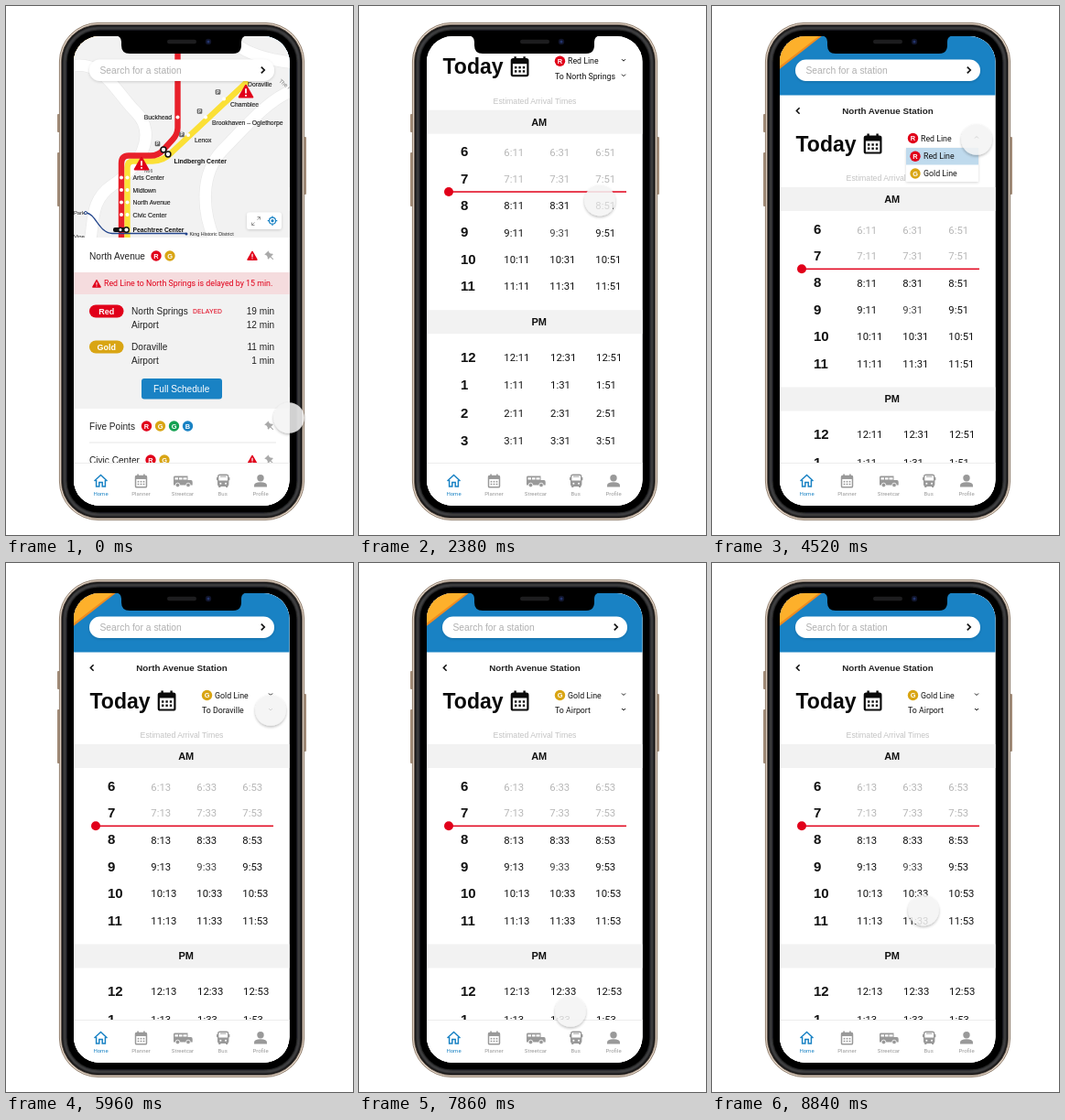
These frames come from a looping animation (379 by 578 pixels, 8920 ms). An HTML page:

```html
<!DOCTYPE html>
<html lang="en">
<head>
<meta charset="utf-8">
<title>Transit schedule prototype</title>
<style>
html, body { margin: 0; width: 100%; height: 100%; overflow: hidden; background: #fff; }
svg { display: block; width: 379px; height: 578px; }
text { font-family: "Liberation Sans", Arial, sans-serif; }
text.r { font-family: Roboto, sans-serif; }
</style>
</head>
<body>
<svg id="stage" viewBox="0 0 379 578" xmlns="http://www.w3.org/2000/svg"></svg>
<script>
const LOOP = 8920;
const RED = '#e1001a', GOLD = '#d9a514', BLUE = '#1982c4', GREEN = '#14a152', GREY = '#999';

// Shape helpers; text y is the middle of the capitals.
const rect = (x, y, w, h, fill, r = 0, more = '') =>
  `<rect x="${x}" y="${y}" width="${w}" height="${h}" rx="${r}" fill="${fill}" ${more}/>`;
const circle = (x, y, r, fill, more = '') => `<circle cx="${x}" cy="${y}" r="${r}" fill="${fill}" ${more}/>`;
const line = (d, color, w, more = '') =>
  `<path d="${d}" fill="none" stroke="${color}" stroke-width="${w}" ${more}/>`;
const fill = (d, color) => `<path d="${d}" fill="${color}"/>`;
const text = (s, x, y, size, color = '#222', more = '') =>
  `<text x="${x}" y="${(y + size * 0.358).toFixed(2)}" font-size="${size}" fill="${color}" ${more}>${s}</text>`;
const at = (x, y, body, more = '') => `<g transform="translate(${x} ${y}) ${more}">${body}</g>`;
const BOLD = 'font-weight="700"', MID = 'text-anchor="middle"', END = 'text-anchor="end"', ROBO = 'class="r"';

const badge = (x, y, s, color) =>
  circle(x, y, 5.7, color) + text(s, x, y, 7.4, '#fff', `${BOLD} ${MID}`);
const chevron = (x, y, s, dir, w = 1.2) => {
  const d = { right: `M${-s / 2} ${-s}L${s / 2} 0L${-s / 2} ${s}`, left: `M${s / 2} ${-s}L${-s / 2} 0L${s / 2} ${s}`,
    down: `M${-s} ${-s / 2}L0 ${s / 2}L${s} ${-s / 2}`, up: `M${-s} ${s / 2}L0 ${-s / 2}L${s} ${s / 2}` }[dir];
  return at(x, y, line(d, '#111', w));
};
const warning = (x, y, k = 1) => at(x, y,
  `<path d="M0 -4.6L5 4.2H-5Z" fill="${RED}" stroke="${RED}" stroke-width="1.4" stroke-linejoin="round"/>` +
  line('M0 -2.2V1.4M0 2.4V3.6', '#fff', 1.2), `scale(${k})`);
const pin = (x, y) => at(x, y,
  fill('M-3.3 -5.5H3.3V-4.3H2.2L2.7 -.8Q4.3 0 4.3 1.7H.6V6H-.6V1.7H-4.3Q-4.3 0 -2.7 -.8L-2.2 -4.3H-3.3Z', '#a9a9a9'),
  'rotate(-45) scale(.9)');
const calendar = (x, y, k, color) => at(x, y,
  `<rect x="-8.8" y="-8" width="17.6" height="18" rx="1.6" fill="none" stroke="${color}" stroke-width="2.2"/>` +
  rect(-9, -8, 18, 5, color) + line('M-5 -11V-6M5 -11V-6', color, 2.4) +
  [0, 4.2].map(dy => [-4.4, 0, 4.4].map(dx => rect(dx - 1.2, dy - .2, 2.4, 2.4, color)).join('')).join(''),
  `scale(${k})`);

const search = () =>
  rect(91, 58.5, 202, 23.5, '#fff', 11.7, 'filter="url(#soft)"') +
  text('Search for a station', 102.5, 70, 10.3, '#b0b0b0') + chevron(280.5, 70, 3.4, 'right', 1.7);

function map() {
  const stop = (x, y) => circle(x, y, 2, '#fff');
  const parking = (x, y) => rect(x - 2.8, y - 2.8, 5.6, 5.6, '#666', 1) + text('P', x, y, 4.6, '#fff', `${BOLD} ${MID}`);
  const name = (s, x, y, more = '') => text(s, x, y, 6.8, '#222', `stroke="#222" stroke-width=".15" ${more}`);
  const roads = ['M70 66C106 58 118 92 142 116C166 140 146 176 116 196C92 212 96 236 92 256',
    'M314 92C286 102 262 132 236 158C212 184 214 224 228 256', 'M240 30C252 48 276 58 314 62'];
  const locals = [['Arts Center', 188], ['Midtown', 201.5], ['North Avenue', 215], ['Civic Center', 228.5]];
  return rect(73, 32, 238, 222, '#f2f2f2') +
    roads.map(d => line(d, '#e9e9e9', 14) + line(d, '#fff', 12.5)).join('') +
    line('M264 82L181 160Q172 169.5 160 169.5H139Q132.5 169.5 132.5 177V254', '#fbe036', 6.4) +
    line('M187.5 32V133Q187.5 140 182 146L171 158Q166 163.5 158 163.5H134Q126 163.5 126 172V254', '#e8202a', 6.4) +
    line('M87 226C98 226 101 248 116 248.5H197', '#23458c', 1.3) +
    circle(87, 226, 1.5, '#fff', 'stroke="#23458c"') + circle(197, 249, 1.5, '#23458c') +
    locals.map(([s, y]) => stop(126, y - .5) + stop(132.5, y - .5) + name(s, 138.5, y)).join('') +
    rect(117, 242, 15, 5, '#111', 2) + circle(125, 244.5, 2.2, '#fff', 'stroke="#111" stroke-width="1.4"') +
    circle(131.5, 244.5, 2.8, '#fff', 'stroke="#111" stroke-width="1.4"') +
    text('Peachtree Center', 138.5, 244.5, 6.8, '#111', BOLD) +
    stop(187.5, 121.5) + name('Buckhead', 181, 121.5, END) +
    stop(199, 141) + name('Lenox', 206, 147) +
    stop(218, 121.5) + name('Brookhaven – Oglethorpe', 225, 127.5) +
    stop(238, 101.5) + name('Chamblee', 245, 108) + name('Doraville', 264, 86) +
    circle(172, 157, 2.9, '#fff', 'stroke="#111" stroke-width="1.5"') +
    circle(177, 162, 2.9, '#fff', 'stroke="#111" stroke-width="1.5"') +
    text('Lindbergh Center', 183.5, 169.5, 6.9, '#111', BOLD) +
    parking(231.5, 94) + parking(211.5, 115) + parking(192, 140.5) + parking(165.5, 150.5) +
    text('Park', 74, 226, 5.8) + text('Vine', 74, 252, 6) + text('King Historic District', 200.5, 249, 5.4) +
    text('N66', 151, 180, 5, '#555') +
    at(299, 81, text('The Pr', 0, 0, 6, '#777'), 'rotate(38)') +
    warning(262, 93.5, 1.45) + warning(148, 172.5, 1.45) +
    rect(263, 225.5, 38, 18.5, '#fff', 3, 'filter="url(#soft)"') +
    line('M274.5 233.5L277.5 230.5M274.5 230.5H277.5V233.5M271.5 236.5L268.5 239.5M268.5 236.5V239.5H271.5', GREY, 1) +
    circle(291, 234.7, 3.5, 'none', `stroke="${BLUE}" stroke-width="1.2"`) + circle(291, 234.7, 1.6, BLUE) +
    line('M291 229.4V231.2M291 238.2V240M285.7 234.7H287.5M294.5 234.7H296.3', BLUE, 1.2);
}

function home() {
  const pill = (s, y, color) => rect(91, y - 7, 37.5, 14, color, 7) + text(s, 109.7, y, 9, '#fff', `${BOLD} ${MID}`);
  const trip = (s, y, wait) => text(s, 137, y, 10.1) + text(wait, 293, y, 10.1, '#222', END);
  return rect(73, 32, 238, 515, '#fff') + map() + search() + rect(73, 253, 238, 38, '#fff') +
    text('North Avenue', 91, 273, 10.1) + badge(164, 273, 'R', RED) + badge(179, 273, 'G', GOLD) +
    warning(269, 273) + pin(288, 273) +
    rect(73, 291, 238, 24, '#f5dcde') + warning(99, 303.5, .85) +
    text('Red Line to North Springs is delayed by 15 min.', 107, 303, 8.83, RED, ROBO) +
    rect(73, 315, 238, 125, '#f2f2f2') + pill('Red', 333.5, RED) + pill('Gold', 372.5, GOLD) +
    trip('North Springs', 333, '19 min') + text('DELAYED', 204, 333, 7.6, RED, ROBO) +
    trip('Airport', 348.5, '12 min') + trip('Doraville', 372, '11 min') + trip('Airport', 387, '1 min') +
    rect(148, 407, 88, 22.5, BLUE, 3) + text('Full Schedule', 191.7, 418.5, 10.1, '#fff', MID) +
    text('Five Points', 91, 459, 10.1) +
    [['R', RED], ['G', GOLD], ['G', GREEN], ['B', BLUE]].map(([s, c], i) => badge(153.5 + i * 15, 459, s, c)).join('') +
    pin(288, 459) + rect(91, 476.5, 204, 1, '#e8e8e8') +
    text('Civic Center', 91, 496.5, 10.1) + badge(158, 496, 'R', RED) + badge(173, 496, 'G', GOLD) +
    warning(269, 496) + pin(288, 496);
}

function schedule() {
  const band = (s, y) => rect(73, y, 238, 26, '#f2f2f2') + text(s, 196.7, y + 13, 11, '#111', `${BOLD} ${MID}`);
  const row = (h, y, pm) => text(h, 111, y, 15, '#111', BOLD) + [0, 20, 40].map((m, i) =>
    text('', 158.3 + i * 50 + (pm && i ? .8 : 0), y + (h === 6 && !pm ? 1.5 : .5), 11.3,
      !pm && h < 8 ? '#b7b7b7' : h === 9 && i === 1 ? '#444' : '#111', `${ROBO} data-h="${h}" data-m="${m}"`)).join('');
  return rect(73, 32, 238, 700, '#fff') + rect(73, 32, 238, 65.5, BLUE) +
    fill('M73 32H121L73 69.5Z', '#ef8b1f') + fill('M73 32H118L73 66.5Z', '#fdb02b') + fill('M73 32H84L73 41Z', '#f08a24') +
    search() + chevron(94, 114.5, 3.2, 'left', 1.6) +
    text('North Avenue Station', 192, 114.5, 9.8, '#222', `${BOLD} ${MID}`) +
    text('Today', 91.5, 150.5, 23, '#0a0a0a', BOLD) + calendar(175.6, 150.5, 1, '#0a0a0a') +
    `<g id="red">${badge(219.5, 144.5, 'R', RED)}</g><g id="gold">${badge(219.5, 144.5, 'G', GOLD)}</g>` +
    text('', 228, 144.5, 8.8, '#111', `${ROBO} id="lineName"`) +
    text('', 214, 161, 8.8, '#111', `${ROBO} id="toward"`) +
    `<g id="shut">${chevron(289, 143.5, 2, 'down', 1)}</g><g id="flip">${chevron(289, 143.5, 2, 'up', 1)}</g>` +
    chevron(289, 160, 2, 'down', 1) +
    text('Estimated Arrival Times', 192, 188, 8.7, '#c3c3c3', MID) +
    band('AM', 198) + band('PM', 416.5) +
    [6, 7, 8, 9, 10, 11].map((h, i) => row(h, 243.2 + i * 29.4, false)).join('') +
    [12, 1, 2, 3, 4, 5, 6, 7].map((h, i) => row(h, 467.8 + i * 30.4, true)).join('') +
    rect(98, 286.6, 194, 1.5, RED) + circle(98, 287.3, 5, RED) +
    menu('lineMenu', 155, ['Red Line', 'Gold Line'], true) +
    menu('towardMenu', 172, ['To Doraville', 'To Airport'], false);
}

function menu(id, y, items, marked) {
  return `<g id="${id}">` + rect(212, y, 79, 37, '#fff', 1, 'filter="url(#soft)"') + rect(212, y, 79, 18.5, '#bfdaed') +
    items.map((s, i) => {
      const cy = y + 9.3 + i * 18.7;
      return (marked ? badge(222, cy, s[0], i ? GOLD : RED) : '') + text(s, marked ? 231 : 217, cy, 8.8, '#111', ROBO);
    }).join('') + '</g>';
}

function nav() {
  const label = (s, x, c) => text(s, x, 533.3, 6, c, `${ROBO} ${MID}`);
  return rect(73, 499, 238, 48, '#fff') + rect(73, 499, 238, .8, '#e9e9e9') +
    line('M96.5 519L103.5 512.5L110.5 519M98.6 518V525H101.8V520.5H105.2V525H108.4V518', BLUE, 1.5) +
    calendar(147.5, 519, .68, GREY) +
    fill('M184 513.5H198.5V518H202Q203.7 518 203.7 520V523.5H183V514.5Z', GREY) +
    line('M184.5 516.4H197.5', '#fff', 2.2) + line('M188.5 515V518M193 515V518', GREY, 1) +
    [187.5, 199].map(x => circle(x, 523.5, 2.3, GREY, 'stroke="#fff" stroke-width=".8"')).join('') +
    rect(231.7, 512.2, 11, 12, 'none', 2, `stroke="${GREY}" stroke-width="1.4"`) +
    rect(231.7, 518.5, 11, 5.7, GREY) + rect(234, 513.6, 6.5, 1, GREY) + rect(230, 515, 1.4, 3.2, GREY) +
    rect(243, 515, 1.4, 3.2, GREY) + rect(232.2, 524, 2.2, 2, GREY) + rect(240, 524, 2.2, 2, GREY) +
    circle(234.4, 521.7, 1, '#fff') + circle(240, 521.7, 1, '#fff') +
    circle(278, 515.8, 3.7, GREY) + fill('M271 525.5V524Q271 520.3 278 520.3Q285 520.3 285 524V525.5Z', GREY) +
    label('Home', 103.5, BLUE) + label('Planner', 147.5, GREY) + label('Streetcar', 193, GREY) +
    label('Bus', 236.7, GREY) + label('Profile', 278, GREY);
}

// Concentric rounded outline, inset from the outer edge of the phone.
const ring = (inset, color, more = '') =>
  rect(58 + inset, 18 + inset, 268 - 2 * inset, 544 - 2 * inset, color, 43 - inset, more);
const body = () =>
  [[118, 20], [160, 31], [175, 44]].map(([y, h]) => rect(56, y, 3, h, '#a28c78', 1)).join('') +
  rect(325.5, 143, 2.5, 63, '#a28c78', 1) +
  ring(.4, '#e6d8ca', 'stroke="#857260" stroke-width=".9"') +
  ring(2.4, '#0c0b0b', 'stroke="#6b5d52" stroke-width=".8"') +
  ring(6, '#000', 'stroke="#48494b" stroke-width="3" filter="url(#sheen)"') + ring(9, '#000');

const notch = () =>
  fill('M119 32Q126 33 126 39V43Q126 52 135 52H248Q257 52 257 43V39Q257 33 264 32Z', '#000') +
  rect(176, 36.8, 32, 4.4, '#1d1d1f', 2.2) + circle(221, 39, 3.2, '#10142a') + circle(221, 39, 1.5, '#24356e');

const stage = document.getElementById('stage');
stage.innerHTML = `<defs>
  <filter id="soft" x="-20%" y="-30%" width="140%" height="170%"><feDropShadow dx="0" dy="1" stdDeviation="1.5" flood-opacity=".16"/></filter>
  <filter id="lift" x="-40%" y="-40%" width="180%" height="180%"><feDropShadow dx="0" dy="1.5" stdDeviation="1.6" flood-opacity=".32"/></filter>
  <filter id="sheen"><feGaussianBlur stdDeviation=".8"/></filter>
  <clipPath id="screen"><rect x="74" y="33" width="235.5" height="513" rx="28"/></clipPath></defs>` +
  body() + `<g clip-path="url(#screen)">${rect(73, 32, 238, 515, '#fff')}<g id="page">${schedule()}</g>` +
  `<g id="home">${home()}</g>${nav()}</g>${notch()}` +
  `<g id="touch">${circle(0, 0, 16.8, '#f4f4f4', 'opacity=".86" filter="url(#lift)"')}</g>`;

const el = {};
stage.querySelectorAll('[id]').forEach(n => el[n.id] = n);
const cells = [...stage.querySelectorAll('[data-h]')];

// Steps: time in ms, then values; eased between neighbours.
const TOUCH = [[0, 309, 450], [80, 309, 450], [720, 192, 418], [1200, 192, 418], [1620, 263, 380], [1680, 263, 380],
  [2100, 263, 212.5], [3240, 263, 212.5], [3800, 289, 146], [4620, 289, 146], [5120, 269, 183], [5560, 269, 183],
  [5960, 289, 161], [6460, 289, 161], [6860, 269, 199.5], [7360, 269, 199.5], [7780, 231, 490], [7860, 231, 490],
  [8270, 231, 379.5], [LOOP, 231, 379.5]];
const SCROLL = [[0, 0], [1680, 0], [2100, 170], [2130, 170], [2630, 0], [7860, 0], [8260, 138], [8320, 138], [8840, 0], [LOOP, 0]];
const HOME = [[0, 1], [900, 1], [1200, 0], [LOOP, 0]];

const ease = p => p < .5 ? 2 * p * p : 1 - 2 * (1 - p) * (1 - p);
function sample(steps, t) {
  const i = Math.max(1, steps.findIndex(s => s[0] > t));
  const a = steps[i - 1], b = steps[i], p = ease((t - a[0]) / (b[0] - a[0]));
  return a.slice(1).map((v, k) => v + (b[k + 1] - v) * p);
}
const show = (node, on) => node.style.display = on ? '' : 'none';

let shownGold = null;
function draw(t) {
  const [x, y] = sample(TOUCH, t), [shift] = sample(SCROLL, t), [fade] = sample(HOME, t);
  const gold = t >= 5300, picking = t >= 3960 && t < 5300;
  el.touch.setAttribute('transform', `translate(${x} ${y})`);
  el.page.setAttribute('transform', `translate(0 ${-shift})`);
  el.home.setAttribute('opacity', fade);
  show(el.home, fade > 0);
  show(el.lineMenu, picking);
  show(el.flip, picking);
  show(el.shut, !picking);
  show(el.towardMenu, t >= 6120 && t < 7040);
  show(el.red, !gold);
  show(el.gold, gold);
  el.lineName.textContent = gold ? 'Gold Line' : 'Red Line';
  el.toward.textContent = !gold ? 'To North Springs' : t < 7040 ? 'To Doraville' : 'To Airport';
  if (gold !== shownGold) {
    cells.forEach(c => c.textContent = `${c.dataset.h}:${+c.dataset.m + (gold ? 13 : 11)}`);
    shownGold = gold;
  }
}

const start = performance.now();
function tick() {
  draw((performance.now() - start) % LOOP);
  requestAnimationFrame(tick);
}
tick();
</script>
</body>
</html>
```
